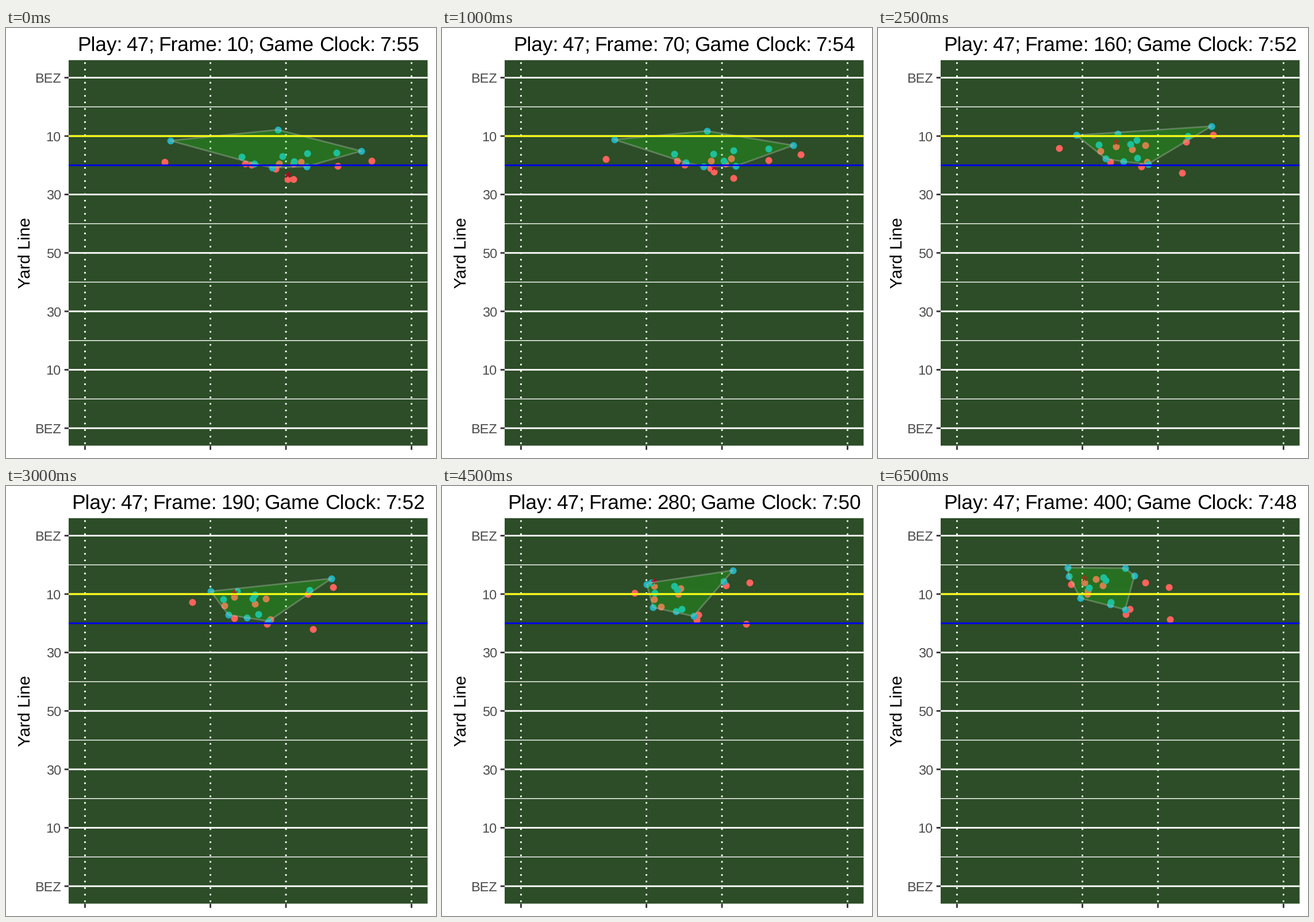
Recreate the animation shown at these times as a matplotlib script. Size 748 by 748 pixels, loop 7 s.

```python
import numpy as np
import matplotlib.pyplot as plt
from matplotlib.animation import FuncAnimation
from matplotlib.patches import Polygon, Rectangle
from matplotlib.textpath import TextPath

SIZE, DPI = 748, 100
PT = 72 / DPI
FONT = "Liberation Sans"
LEFT, RIGHT, TOP, BOTTOM = 109, 733.4, 56, 726.5
YARD_10, STEP = 188.0, 101.63
LINE, THIN, DOT = 2.85, 1.42, 12
TITLE = 35.2
FRAMES, INTERVAL = 14, 500
MID, END = 7, 13

# Each player: position at the snap, mid-play and at the end.
RUNNER = [(490, 263), (384, 184), (359, 168)]
OFFENSE = [
    RUNNER,
    [(500, 263), (536, 246), (508, 232)],
    [(276, 233), (330, 197), (336, 171)],
    [(577, 240), (515, 181), (465, 168)],
    [(636, 231), (557, 170), (506, 176)],
    [(416, 236), (375, 204), (364, 188)],
    [(427, 238), (392, 226), (365, 182)],
    [(469, 245), (451, 238), (431, 223)],
    [(475, 236), (426, 199), (391, 173)],
    [(500, 236), (454, 230), (438, 214)],
    [(513, 233), (440, 190), (379, 162)],
]
DEFENSE = [
    [(432, 236), (380, 221), (352, 195)],
    [(463, 243), (413, 226), (404, 206)],
    [(501, 232), (430, 221), (405, 202)],
    [(523, 241), (448, 233), (430, 215)],
    [(410, 224), (374, 193), (367, 177)],
    [(481, 223), (421, 191), (396, 164)],
    [(524, 218), (420, 184), (392, 159)],
    [(286, 196), (362, 180), (332, 157)],
    [(473, 177), (389, 181), (330, 142)],
    [(575, 217), (517, 175), (446, 156)],
    [(618, 214), (551, 154), (430, 143)],
]


def place(players, t):
    """Leave the start from rest, run through the middle, settle at the end."""
    a, b, c = np.moveaxis(np.array(players, float), 1, 0)
    late = END - MID
    speed = ((b - a) / MID * late + (c - b) / late * MID) / END
    if t <= MID:
        u = t / MID
        ease = u * u * (3 - 2 * u)
        return a + (b - a) * ease - speed * MID * u * u * (1 - u)
    u = (t - MID) / late
    ease = u * u * (3 - 2 * u)
    return b + (c - b) * ease + speed * late * u * (1 - u) ** 2


def hull(points):
    pts = sorted(map(tuple, points))

    def chain(seq):
        out = []
        for x, y in seq:
            while len(out) > 1 and ((out[-1][0] - out[-2][0]) * (y - out[-2][1])
                                    <= (out[-1][1] - out[-2][1]) * (x - out[-2][0])):
                out.pop()
            out.append((x, y))
        return out[:-1]

    return chain(pts) + chain(pts[::-1])


def advance(s):
    def end(text):
        return TextPath((0, 0), text, size=TITLE, prop={"family": FONT}).get_extents().x1
    return end(s + "l") - end("l")


plt.rcParams["text.hinting"] = "none"
fig = plt.figure(figsize=(SIZE / DPI, SIZE / DPI), dpi=DPI, facecolor="white")
ax = fig.add_axes([0, 0, 1, 1])
ax.set_xlim(0, SIZE)
ax.set_ylim(SIZE, 0)
ax.axis("off")


def line(xs, ys, color, width=LINE, z=1, **kw):
    ax.plot(xs, ys, color=color, lw=width * PT, zorder=z, snap=False,
            solid_capstyle="butt", dash_capstyle="butt", **kw)


def across(y, color, width=LINE, z=1):
    line([LEFT, RIGHT], [y, y], color, width, z)


def label(x, y, s, size, color="black", **kw):
    return ax.text(x, y, s, fontsize=size * PT, color=color, family=FONT,
                   va="baseline", **kw)


ax.add_patch(Rectangle((LEFT, TOP), RIGHT - LEFT, BOTTOM - TOP,
                       fc="#2c4d27", ec="none", zorder=0, snap=False))
for i, name in enumerate(["BEZ", "10", "30", "50", "30", "10", "BEZ"]):
    y = YARD_10 + (i - 1) * STEP
    across(y, "white")
    line([LEFT - 7.3, LEFT], [y, y], "#333333")
    label(95.8, y + 8.4, name, 23.47, "#4d4d4d", ha="right")
    if i < 6:
        across(y + STEP / 2, "white", THIN)
for x in (137.4, 355.6, 487, 705.4):
    line([x, x], [BOTTOM, TOP], "white", ls=(3, (1, 3)))
    line([x, x], [BOTTOM, BOTTOM + 7.3], "#333333")
across(YARD_10, "#ffff00", z=6)
across(YARD_10 + STEP / 2, "#0000ee", z=6)
label(41.3, 391.5, "Yard Line", 29.33, ha="center", rotation=90,
      rotation_mode="anchor")


def dots(color, z):
    return ax.plot([], [], "o", ms=DOT * PT, mfc=color, mec="none", zorder=z)[0]


offense = dots("#ff625c", 2)
defense = dots("#20b1be", 3)
ball = ax.plot([], [], marker=(5, 2, 0), ms=11 * PT, mew=1.9 * PT,
               mec="#aa0a1e", ls="none", zorder=4)[0]
zone = ax.add_patch(Polygon([(0, 0)] * 3, fc=(0.08, 1, 0.04, 0.2),
                            ec=(0.75, 0.75, 0.75, 0.36), lw=LINE * PT,
                            joinstyle="round", zorder=5))
words = [label(0, 40, "", TITLE, ha="left") for _ in range(7)]


def set_title(text):
    parts = text.split()
    # Spaces after punctuation are kerned tighter.
    steps = [advance(p) + TITLE * (0.2 if p[-1] in ":;" else 0.278) for p in parts]
    total = sum(steps[:-1]) + advance(parts[-1])
    x = (LEFT + RIGHT - total) / 2
    for word, part, step in zip(words, parts, steps):
        word.set_text(part)
        word.set_x(x)
        x += step


def draw(k):
    team = place(DEFENSE, k)
    offense.set_data(*place(OFFENSE, k).T)
    defense.set_data(*team.T)
    ball.set_data(*(place([RUNNER], k) - (0, 8)).T)
    zone.set_xy(hull(team))
    set_title(f"Play: 47; Frame: {10 + 30 * k}; Game Clock: 7:{55 - (k + 1) // 2}")
    return [offense, defense, ball, zone, *words]


anim = FuncAnimation(fig, draw, frames=FRAMES, interval=INTERVAL, repeat=True,
                     repeat_delay=0, blit=False)
plt.show()
```
